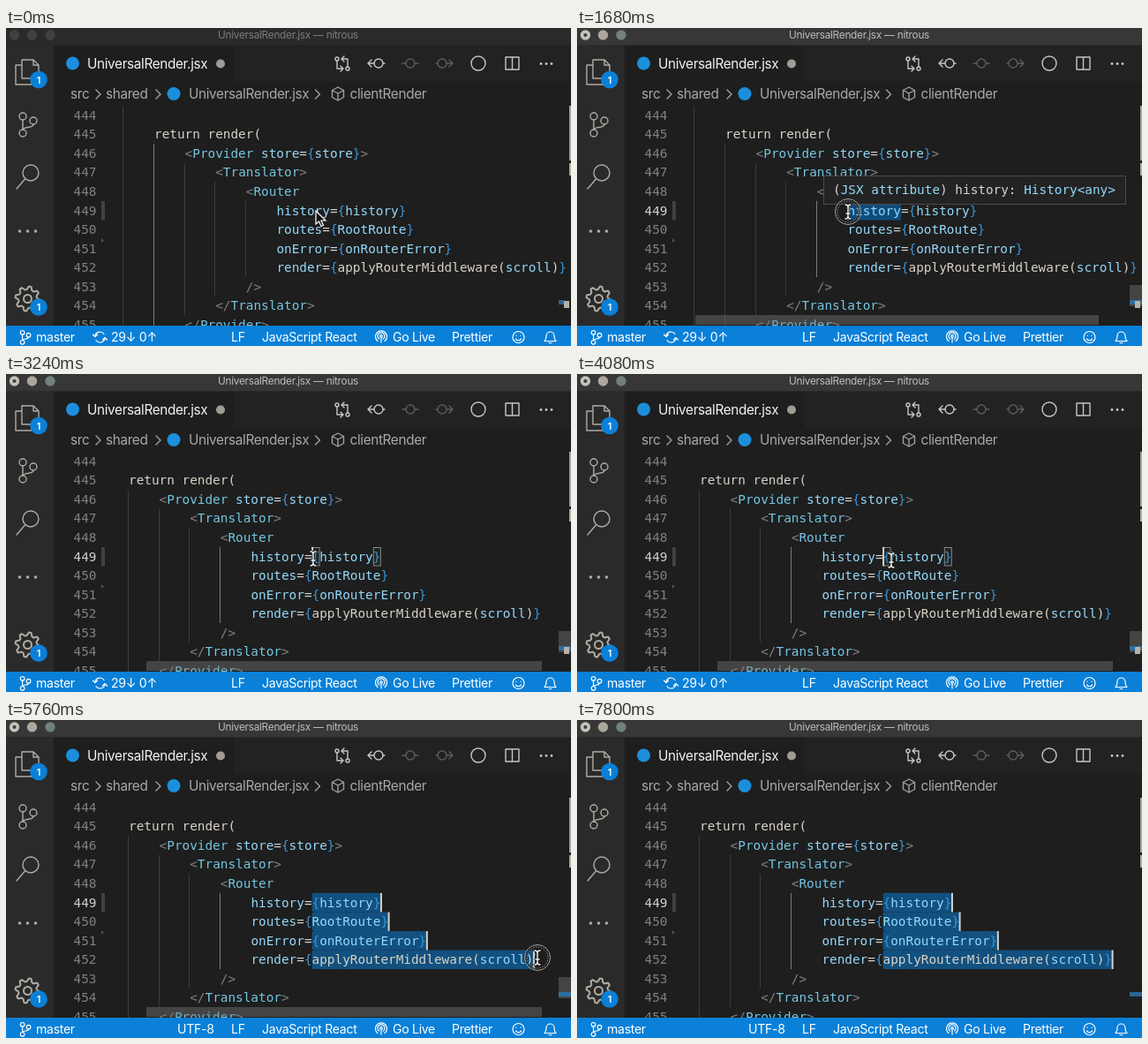
An HTML page that plays this animation: 640x360 px, repeating every 7860 ms.

```html
<!DOCTYPE html>
<html lang="en">
<head>
<meta charset="utf-8">
<title>Column selection</title>
<style>
  html, body { margin: 0; width: 100%; height: 100%; overflow: hidden; background: #1e1e1e; }
  svg { display: block; width: 100vw; height: 100vh; }
  text { white-space: pre; }
  .ui { font: 15.3px Inter, sans-serif; letter-spacing: -.022em; }
  .status { font-size: 14.1px; fill: #fff; }
  .code { font: 14.37px "DejaVu Sans Mono", monospace; }
  .line { fill: none; stroke-width: 1.4; stroke-linecap: round; stroke-linejoin: round; }
  .f { fill: #d8d2c6 } .g { fill: #808080 } .t { fill: #74c6e2 }
  .a { fill: #94d8fa } .p { fill: #d4d4d0 } .b { fill: #3a94d8 }
</style>
</head>
<body>
<svg viewBox="0 0 640 360" xmlns="http://www.w3.org/2000/svg">
  <defs>
    <clipPath id="editorClip"><rect x="117" y="87.5" width="523" height="249.5"/></clipPath>
    <g id="branch"><circle cx="-5" cy="-9" r="4"/><circle cx="-5" cy="10" r="4"/><circle cx="7" cy="-4" r="4"/><path d="M-5-5V6M7 0C7 5-4 2-5 6"/></g>
    <path id="beamShape" d="M-3-8Q0-8 0-5V5Q0 8-3 8M3-8Q0-8 0-5M0 5Q0 8 3 8M-2 2H2"/>
  </defs>

  <rect width="640" height="360" fill="#1e1e1e"/>
  <rect y="19.5" width="53.7" height="318" fill="#2a2a2a"/>
  <rect x="258" y="19.5" width="382" height="41.8" fill="#222223"/>
  <rect id="titleBar" width="640" height="19.5"/>
  <g id="lights"><circle cx="9.5" cy="8" r="5.7"/><circle cx="29.5" cy="8" r="5.7"/><circle cx="50" cy="8" r="5.7"/></g>
  <circle id="unsaved" cx="9.5" cy="8" r="2" fill="#3a3a3a"/>
  <text id="title" class="ui" style="font-size:11.8px" x="319.500" y="12" text-anchor="middle">UniversalRender.jsx — nitrous</text>

  <!-- activity bar -->
  <g class="line" stroke="#b0aca4" stroke-width="2">
    <path d="M18 42V36H31L37 42V57H18V42M31 36V42H37M18 42H11V64H29V57"/>
    <use href="#branch" x="24" y="109"/>
    <circle cx="28" cy="164" r="9"/><path d="M21.5 171L12 182"/>
    <g id="gear" style="stroke-width:2"></g>
  </g>
  <g fill="#b0aca4"><circle cx="15.5" cy="230" r="1.8"/><circle cx="24.5" cy="230" r="1.8"/><circle cx="33.5" cy="230" r="1.8"/></g>
  <g fill="#0a80d8"><circle cx="37" cy="58.5" r="9.8"/><circle cx="37" cy="316" r="9.8"/></g>
  <g class="ui" style="font-size:11px;font-weight:600" fill="#fff" text-anchor="middle"><text x="37" y="62.5">1</text><text x="37" y="320">1</text></g>

  <!-- tab and breadcrumbs -->
  <g fill="#1c8fdc"><circle cx="75.5" cy="40" r="7.5"/><circle cx="190" cy="74.5" r="7.5"/></g>
  <text class="ui" x="92" y="46" fill="#f2f2f2">UniversalRender.jsx</text>
  <circle cx="243" cy="40.5" r="5" fill="#a09c94"/>
  <g class="ui" fill="#a9a9a9">
    <text x="73" y="80">src</text><text x="113" y="80">shared</text>
    <text x="207" y="80">UniversalRender.jsx</text><text x="389.500" y="80">clientRender</text>
  </g>
  <g class="line" stroke="#a0a0a0">
    <path d="M102 70l5 5-5 5M170 70l5 5-5 5M350.500 70l5 5-5 5"/>
    <path d="M376 67l6.500 3.500v8L376 82l-6.500-3.500v-8zM369.500 70.500L376 74l6.500-3.500M376 74v8"/>
  </g>

  <!-- editor actions -->
  <g class="line" stroke="#c5c5c5">
    <circle cx="375" cy="35" r="2"/><circle cx="387" cy="46" r="2"/>
    <path d="M375 37v9h6M379 43l3 3-3 3M387 44V35h-6M383 32l-3 3 3 3"/>
    <circle cx="422" cy="40" r="5"/><path d="M417 40h-6M414 36l-4 4 4 4M427 40h2"/>
    <circle cx="535" cy="40" r="8"/>
    <path d="M566 33h15v14h-15zM573.500 33v14"/>
    <g stroke="#5c5c5c"><circle cx="458" cy="40" r="5"/><path d="M449 40h4M463 40h4"/>
      <circle cx="494" cy="40" r="5"/><path d="M487 40h2M499 40h6M502 36l4 4-4 4"/></g>
  </g>
  <g fill="#c5c5c5"><circle cx="606" cy="40.500" r="1.4"/><circle cx="612" cy="40.500" r="1.4"/><circle cx="618" cy="40.500" r="1.4"/></g>

  <!-- gutter and editor -->
  <g id="numbers" class="code" fill="#7e8282"></g>
  <rect x="108" y="196" width="4" height="21.500" fill="#404242"/>
  <path d="M108 238l3 2.500-3 2.500z" fill="#505050"/>
  <g clip-path="url(#editorClip)">
    <g id="scroller">
      <g id="guides"></g>
      <g id="selection" fill="#12507f"></g>
      <rect id="wordMark" x="306" y="196" width="61" height="21.500" fill="#0f4d7c"/>
      <g id="brackets" fill="#1f3a28" fill-opacity=".3" stroke="#888"></g>
      <g id="code" class="code"></g>
      <g id="carets" fill="#d8d0c4"></g>
    </g>
    <g id="hover" class="code">
      <rect x="279.500" y="167.500" width="342" height="32" fill="#232324" stroke="#4a4a4a"/>
      <text class="p" x="290" y="188">(<tspan class="a">JSX attribute</tspan>) history: <tspan class="a">History&lt;any&gt;</tspan></text>
    </g>
    <rect x="638" y="88" width="2" height="62" fill="#a8a6a0"/>
    <rect x="638" y="153" width="2" height="14" fill="#b8aea0"/>
    <g id="bars" fill="#797979" fill-opacity=".42">
      <rect id="hbar" y="325" height="11"/>
      <rect x="626" y="291" width="14" height="24"/>
    </g>
    <rect id="viewMark" x="626" y="308" height="5" fill="#2a78b4" fill-opacity=".8"/>
    <rect id="rulerMark" x="632" y="309" width="6" height="8" fill="#b8b0a4"/>
  </g>

  <!-- status bar -->
  <rect y="337" width="640" height="23" fill="#0a80d8"/>
  <g class="ui status">
    <text x="34" y="355">master</text>
    <text id="sync" x="119" y="355">29↓ 0↑</text>
    <text id="encoding" x="194" y="355">UTF-8</text>
    <text x="255" y="355">LF</text><text x="290" y="355">JavaScript React</text>
    <text x="438" y="355">Go Live</text><text x="505" y="355">Prettier</text>
  </g>
  <g class="line" stroke="#fff" style="stroke-width:1.2">
    <use href="#branch" transform="translate(21.500 350) scale(.58)" style="stroke-width:2"/>
    <path id="syncIcon" d="M101 348.500a5.500 5.500 0 0 1 10-2M112 351.500a5.500 5.500 0 0 1-10 2M98.500 347l2.500 2.500 2.500-2.500M114.500 353l-2.500-2.500-2.500 2.500"/>
    <circle cx="425" cy="349" r="1.3"/><path d="M425 351v5M422.500 352a4 4 0 1 1 5 0M421 354.500a6.500 6.500 0 1 1 8 0"/>
    <circle cx="580.500" cy="350" r="6.500"/><path d="M577.500 352q3 3.500 6 0M578 348v.3M583 348v.3"/>
    <path d="M610 354.500q2-2 2-6a4.500 4.500 0 0 1 9 0q0 4 2 6zM615 356.500h3"/>
  </g>

  <!-- pointer -->
  <g id="pointer">
    <g id="ring" fill="none"><circle r="13" stroke="#161616" stroke-width="3" stroke-opacity=".6"/><circle r="14.500" stroke="#a4a4a0"/><circle r="12" stroke="#a0a09c" stroke-dasharray="1.500 1.500"/></g>
    <g id="beam" fill="none" stroke-linecap="round"><use href="#beamShape" stroke="#111" stroke-width="3.200"/><use href="#beamShape" stroke="#f4f4f4" stroke-width="1.4"/></g>
    <path id="arrow" d="M0 0V15l3.500-3 2.500 5.500 2.500-1-2.500-5.500H11z" fill="#111" stroke="#fff" stroke-width="1.2"/>
    <path id="resize" d="M0-7L6-.5H2.500V6H-2.500V-.5H-6z" fill="#111" stroke="#fff" stroke-width="1.4"/>
  </g>
</svg>
<script>
const $ = id => document.getElementById(id);
const LOOP = 7860, CHAR = 8.65, ROW = 21.55, ROW_TOP = 88.1, CODE_X = 168, SCROLL = 29;
const colX = col => CODE_X + col * CHAR;
const rowY = row => ROW_TOP + row * ROW;
const baseline = row => Math.round(rowY(row) + 15.7);
const rect = (x, y, w, h, extra = '') => `<rect x="${x}" y="${y}" width="${w}" height="${h}" ${extra}/>`;
const between = (t, a, b) => t >= a && t < b;
const clamp = (v, a, b) => Math.min(b, Math.max(a, v));
const ease = u => u * u * (3 - 2 * u);
const show = (id, on) => $(id).setAttribute('visibility', on ? 'visible' : 'hidden');

// Each line: row, column, then class:text tokens
const lines = [
  [1, 0, 'f:return render('],
  [2, 4, 'g:<|t:Provider |a:store|p:=|b:{|a:store|b:}|g:>'],
  [3, 8, 'g:<|t:Translator|g:>'],
  [4, 12, 'g:<|t:Router'],
  [5, 16, 'a:history|p:=|b:{|a:history|b:}'],
  [6, 16, 'a:routes|p:=|b:{|a:RootRoute|b:}'],
  [7, 16, 'a:onError|p:=|b:{|a:onRouterError|b:}'],
  [8, 16, 'a:render|p:=|b:{|f:applyRouterMiddleware(|a:scroll|p:)|b:}'],
  [9, 12, 'g:/>'],
  [10, 8, 'g:</|t:Translator|g:>'],
  [11, 4, 'g:</|t:Provider|g:>']
];
const escape = s => s.replace(/</g, '&lt;').replace(/>/g, '&gt;');
$('code').innerHTML = lines.map(([row, col, src]) =>
  `<text x="${colX(col)}" y="${baseline(row)}">` + src.split('|').map(tok =>
    `<tspan class="${tok[0]}">${escape(tok.slice(2))}</tspan>`).join('') + '</text>').join('');

$('numbers').innerHTML = Array.from({ length: 12 }, (_, i) =>
  `<text x="76.500" y="${baseline(i)}">${444 + i}</text>`).join('');
const activeNumber = $('numbers').children[5];

// Indent guides: column, first row, row after last
const guides = [[-4, 0, 12], [0, 2, 12], [4, 3, 11], [8, 4, 10], [12, 5, 9]];
$('guides').innerHTML = guides.map(([col, a, b]) =>
  rect(Math.round(colX(col)) - 1, rowY(a), 1, rowY(b) - rowY(a))).join('');

$('brackets').innerHTML = [24, 32].map(col => rect(colX(col) + .5, 196.5, 8, 20.5)).join('');

const teeth = Array.from({ length: 32 }, (_, i) => {
  const r = i % 4 < 2 ? 14 : 10.5, a = (i + .5) * Math.PI / 16;
  return (24.5 + r * Math.cos(a)).toFixed(1) + ' ' + (306.5 + r * Math.sin(a)).toFixed(1);
});
$('gear').innerHTML = `<path d="M${teeth.join('L')}Z"/><circle cx="24.500" cy="306.500" r="4.500"/>`;

const path = [
  [0, 351, 207], [300, 351, 207], [900, 307, 208], [1740, 307, 208], [2220, 621, 266],
  [2580, 621, 266], [2950, 348, 209], [3420, 348, 209], [3700, 356, 211], [4080, 356, 211],
  [4260, 348, 209], [4380, 348, 209], [5700, 602, 269], [5765, 602, 269], [5790, 608, 269],
  [6300, 608, 269], [7140, 313, 335], [7300, 312, 372], [LOOP, 312, 372]
];
function pointerAt(t) {
  const i = path.findIndex((p, n) => n && t <= p[0]);
  const [t0, x0, y0] = path[i - 1], [t1, x1, y1] = path[i];
  const u = ease((t - t0) / (t1 - t0));
  return [x0 + (x1 - x0) * u, y0 + (y1 - y0) * u];
}

const FOCUS = 960, CLICK = 2980, DRAGS = [[1740, 2220, 16], [4380, 5790, 24]];
const LINE_ENDS = [33, 34, 39, 54];
const blinkOn = (t, since) => Math.floor((t - since) / 500) % 2 === 0;

function carets(t, scroll) {
  if (t < FOCUS) return [];
  const drag = t >= DRAGS[1][0] ? DRAGS[1] : between(t, DRAGS[0][0], CLICK) ? DRAGS[0] : null;
  if (!drag) return [{ row: 5, from: t < CLICK ? 16 : 24, to: t < CLICK ? 16 : 24 }];
  const [, end, from] = drag;
  const [x, y] = pointerAt(Math.min(t, end));
  const col = Math.max(from, Math.floor((x + scroll - CODE_X) / CHAR));
  const last = clamp(Math.floor((y - ROW_TOP) / ROW), 5, 8);
  return LINE_ENDS.slice(0, last - 4).map((lineEnd, i) => ({ row: 5 + i, from, to: Math.min(col, lineEnd) }));
}

function draw(t) {
  const focused = t >= FOCUS;
  const scrolled = ease(clamp((t - 2080) / 130, 0, 1));
  const scroll = SCROLL * scrolled;
  const marks = carets(t, scroll);
  const multi = marks.length > 1;
  const [x, y] = pointerAt(t);

  $('titleBar').setAttribute('fill', focused ? '#373737' : '#2a2a2a');
  $('title').setAttribute('fill', focused ? '#bdbdbd' : '#7c7c7c');
  [...$('lights').children].forEach((c, i) =>
    c.setAttribute('fill', focused ? ['#c4c2ba', '#aca69c', '#70827a'][i] : '#414141'));
  show('unsaved', focused);
  activeNumber.setAttribute('fill', focused ? '#d0d0d0' : '#7e8282');
  [...$('guides').children].forEach((g, i) =>
    g.setAttribute('fill', i === (focused ? 4 : 1) ? '#7c7c7a' : '#3c3c3c'));

  $('scroller').setAttribute('transform', `translate(${-scroll})`);
  $('selection').innerHTML = marks.filter(m => m.to > m.from).map(m =>
    rect(colX(m.from), rowY(m.row), (m.to - m.from) * CHAR, ROW, 'rx="2"')).join('');
  $('carets').innerHTML = marks.map(m => rect(colX(m.to) - .5, rowY(m.row), 2, ROW)).join('');
  const resets = [FOCUS, 1560, 2220, CLICK, 4380, 5780];
  const since = resets.filter(r => r <= t).pop();
  const dragging = DRAGS.some(([a, b]) => between(t, a, b));
  show('carets', focused && (dragging || blinkOn(t, since)));
  show('brackets', between(t, CLICK, DRAGS[1][0]));

  const hovering = between(t, 1320, 1770);
  show('hover', hovering);
  show('wordMark', hovering);
  show('rulerMark', !multi);
  $('viewMark').setAttribute('width', focused ? 14 : 7);
  show('sync', !multi);
  show('syncIcon', !multi);
  show('encoding', multi);

  $('hbar').setAttribute('x', 134 + 25 * scrolled);
  $('hbar').setAttribute('width', 457 - 9 * scrolled);
  $('bars').setAttribute('opacity', focused ? 1 - clamp((t - 7380) / 380, 0, 1) : 0);

  const atEdge = t > 6900 && y > 328;
  $('pointer').setAttribute('transform', `translate(${x} ${y})`);
  show('arrow', !focused);
  show('beam', focused && !atEdge);
  show('resize', atEdge);
  show('ring', between(t, 1560, 2600) || between(t, 4320, 6060));
}

const start = performance.now();
(function tick() {
  draw((performance.now() - start) % LOOP);
  requestAnimationFrame(tick);
})();
</script>
</body>
</html>
```
